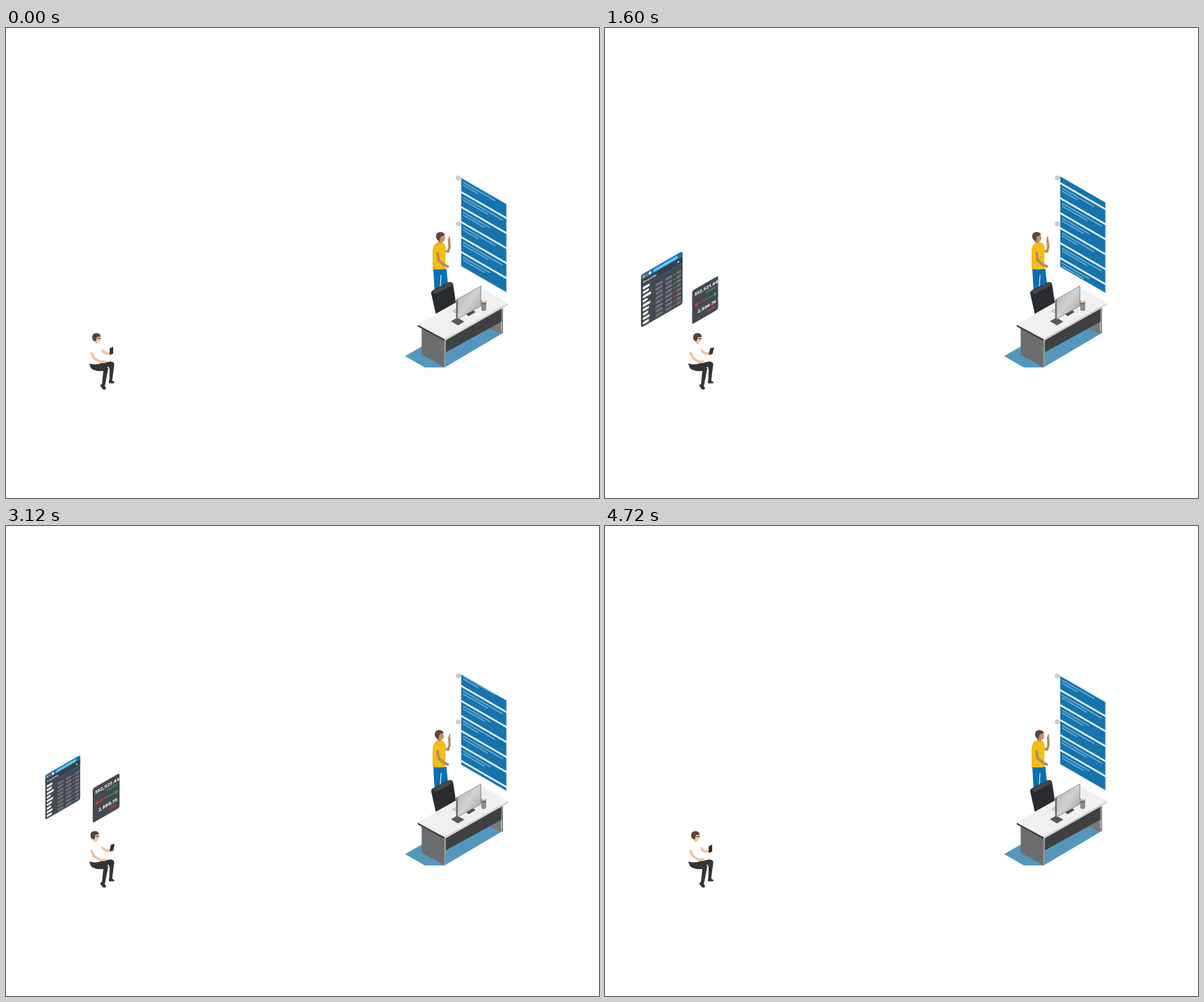
Recreate the animation shown at these times as an HTML page. Size 841x666 px, loop 4.8 s.

```html
<!DOCTYPE html>
<html lang="en">
<head>
<meta charset="utf-8">
<style>
  html, body { margin: 0; width: 100%; height: 100%; overflow: hidden; background: #fff; }
  svg { display: block; width: 841px; height: 666px; }
  text { font-family: Inter, "Open Sans", sans-serif; font-weight: 800; }
  .limb { fill: none; stroke-linecap: round; stroke-linejoin: round; }
</style>
</head>
<body>
<svg viewBox="0 0 841 666" xmlns="http://www.w3.org/2000/svg">
  <defs>
    <linearGradient id="screen" x1="0" y1="0" x2="1" y2="1">
      <stop offset="0" stop-color="#a9abad"/>
      <stop offset=".5" stop-color="#d0d1d2"/>
      <stop offset="1" stop-color="#9b9d9f"/>
    </linearGradient>
    <clipPath id="feedClip"><path d="M0-2H66V126H0Z"/></clipPath>
    <clipPath id="winClip"><rect width="59" height="75" rx="3.5"/></clipPath>
  </defs>

  <!-- feed -->
  <g transform="matrix(1 .577 0 1 645 212)" clip-path="url(#feedClip)"><g id="feed"></g></g>
  <g fill="#cbcdce"><circle cx="641.5" cy="212.5" r="3.5"/><circle cx="641.5" cy="277.5" r="3.5"/></g>

  <!-- standing man -->
  <path fill="#0b6fb0" d="M606 341H624.5L626.5 360 625 376H608Z"/>
  <path d="M617 350L615.500 374" stroke="#fff" stroke-width="1"/>
  <g id="raised" class="limb" stroke="#b58a5f">
    <path d="M622.500 315.500L627 317 629 310 628.300 300" stroke-width="3.400"/>
    <path d="M628.300 300L628.800 296" stroke-width="1.800"/>
  </g>
  <path fill="#f3bd17" d="M605 315Q606 306 611 304.500L617 303Q622 305 623.500 310L623 341.500Q614 343 605 341.500Z"/>
  <path class="limb" d="M612 319L613.500 329 621 335.500 626.500 338" stroke="#b58a5f" stroke-width="3.700"/>
  <g id="headA">
    <path fill="#b58a5f" d="M613 297H619V304Q616 306 613 304Z"/>
    <ellipse cx="618.500" cy="298" rx="4.300" ry="5" fill="#c0946a"/>
    <path fill="#5d463e" d="M610 297Q609 289.500 616 289Q622 289.500 622.500 294Q617 294 616 297L615 302Q611 301 610 297Z"/>
  </g>

  <!-- desk -->
  <path fill="#5497bd" d="M566 465L592 450 690 410 705 432 622 481H594Z"/>
  <path fill="#77797b" d="M685 425L702 415V432L700 433Z"/>
  <path fill="#3f4041" d="M623 441L703 395V416L623 460Z"/>
  <path fill="#8c8e90" d="M702.500 396L705 395V433L702.500 432Z"/>
  <path fill="#6c6d6f" d="M589.500 424L622 441V481L589.500 463Z"/>
  <path fill="#939597" d="M621.500 441L624 440V480L621.500 481Z"/>
  <path fill="#f0f0f1" d="M584 420.500L674 368 712 390 622 441Z"/>
  <path fill="#3c3d3e" d="M584 420.500L622 441V443.500L584 423Z"/>
  <path fill="#d3d4d5" d="M622 441L712 390V392.500L622 443.500Z"/>
  <path fill="#292b2f" d="M603 376Q602.500 373.500 605 372L627 360.500Q633 359 634 363L638 389 609.500 405Z"/>
  <path fill="#45474a" d="M604 374L627 360.500 633.500 362 632 365 609.500 377Z"/>
  <path fill="#d2d3d4" stroke="#999" stroke-width=".6" d="M633 401.500L641 397V402L639 404Z"/>
  <path fill="#555759" d="M631 415.500L640 410.500 650 416 641 421.500Z"/>
  <path fill="#4c4e50" d="M652 405L662 399.500 666 402.500 656 408.500Z"/>
  <path fill="url(#screen)" stroke="#7c7e80" stroke-width=".8" d="M640 384.500L673.500 365.500V394L640 412.500Z"/>
  <path fill="#58595b" d="M638.500 385L640.300 384V413L638.500 412Z"/>
  <path d="M675.500 391L674.500 386M678 391V387M680 391L681 387" stroke="#d98a49" stroke-width="1.400"/>
  <path fill="#8c8e90" d="M674 390.500H681V399.500Q677.500 403 674 399.500Z"/>
  <ellipse cx="677.500" cy="390.500" rx="3.500" ry="1.200" fill="#68696b"/>

  <!-- floating panels -->
  <g id="win"><g id="winBody" transform="matrix(1 -.577 0 1 51 350)" clip-path="url(#winClip)">
    <path fill="#454951" d="M0 0H59V75H0Z"/>
    <path fill="#1573ae" d="M0 0H59V8H0Z"/>
    <circle cx="4" cy="4.500" r="1.900" fill="#f09a3e"/>
    <circle cx="8.500" cy="4.500" r="1.900" fill="#e8483f"/>
    <circle cx="13" cy="4.500" r="1.900" fill="#fff"/>
    <rect x="17.500" y="2.500" width="35" height="4" rx="2" fill="#66cbf3"/>
    <path fill="#3a3f47" d="M0 8H59V16.500H0Z"/>
    <text x="3" y="13.700" font-size="4" fill="#fff">Overview</text>
    <circle cx="53" cy="12" r="1.200" fill="#fff"/>
    <path d="M0 16.800H59" stroke="#1573ae" stroke-width=".8"/>
  </g></g>
  <g id="card"><g transform="matrix(1 -.577 0 1 123 372)">
    <rect width="38" height="49" rx="2.500" fill="#454951"/>
    <text x="3" y="10" font-size="6.100" fill="#fff">352,521.44</text>
    <text x="35" y="16" font-size="4.200" text-anchor="end" fill="#2fae66">PROFIT</text>
    <path d="M5 24H20" stroke="#e3423d" stroke-width="1.200"/>
    <path d="M20 24H34" stroke="#2fae66" stroke-width="1.200"/>
    <path fill="#e3423d" d="M3 24L7 21V27Z"/>
    <path fill="#2fae66" d="M36 24L32 21V27Z"/>
    <text x="8" y="37.500" font-size="6.100" fill="#fff">2,899.75</text>
    <text x="34" y="44" font-size="4.200" text-anchor="end" fill="#e3423d">LOSS</text>
  </g></g>

  <!-- seated man -->
  <g fill="#343435">
    <path d="M118 475.500Q127 478 135 475L148 472.500Q154 473 153.500 477L150.500 500H146.500L147 484 145.500 480 140.500 506H136L138 486Q125 487 120.500 482Z"/>
    <path d="M146 499.500H150.500L154 502Q154 503.500 152 503.500H146Z"/>
    <path d="M134.500 504.500L139.500 505.500 142 511Q140 513.500 137 511.500L134 507.500Z"/>
  </g>
  <circle cx="145" cy="481" r="1" fill="#fff"/>
  <g id="reach">
    <path class="limb" d="M135 456L141 461 150.500 461" stroke="#efc3a0" stroke-width="3.700"/>
    <path id="phone" fill="#303033" d="M147 454L152 451.500V461L147 463.500Z"/>
  </g>
  <path fill="#fff" d="M118 462Q118 449 125 446L131 446Q135 449 136 458L135 474Q127 477 119 475Z"/>
  <path class="limb" d="M121.500 461L125 468 133 473 140 473" stroke="#efc3a0" stroke-width="3.700"/>
  <g id="headB">
    <path fill="#efc3a0" d="M126 441H131.500V446.500Q128 449 126 446Z"/>
    <ellipse cx="130.500" cy="440.500" rx="4" ry="4.800" fill="#f3cbaa"/>
    <path fill="#554239" d="M122.300 440Q121.500 432.500 128.500 432.300Q134 432.500 134.300 437.500L129 437.800 127.500 444Q123 444 122.300 440Z"/>
    <path d="M129 440H134.500" stroke="#3a3030" stroke-width="1"/>
  </g>
</svg>
<script>
const LOOP = 4800, STEP = 80, PITCH = 21.25;
const $ = id => document.getElementById(id);
const clamp = x => Math.min(1, Math.max(0, x));

function add(parent, tag, attrs) {
  const el = document.createElementNS('http://www.w3.org/2000/svg', tag);
  for (const k in attrs) el.setAttribute(k, attrs[k]);
  parent.appendChild(el);
}

// Three posts repeat; each has two text lines.
const posts = [[45, 21], [56, 35], [38, 30]];
for (let i = 0; i < 10; i++) {
  const y = i * PITCH;
  add($('feed'), 'rect', { x: .3, y, width: 64.6, height: 19, fill: '#1573ae', stroke: '#c3d7e4', 'stroke-width': .7 });
  posts[i % 3].forEach((w, n) => add($('feed'), 'path', {
    d: `M4 ${y + 4.6 + n * 4}h${w - 1}`, stroke: '#69a8cf', 'stroke-width': 2, 'stroke-linecap': 'round'
  }));
}

const names = [10, 9, 12, 7, 11, 9, 8, 10, 9];
names.forEach((w, i) => {
  const y = 18.8 + i * 6.2;
  const pill = (x, width, fill) => add($('winBody'), 'rect', { x, y, width, height: 3.6, rx: 1.8, fill });
  pill(2.5, w, '#fff');
  if (!i) return;
  pill(20.5, 10.5, '#70747c');
  pill(34.5, 10, '#70747c');
  pill(50, 7, '#70747c');
  add($('winBody'), 'circle', { cx: 47.2, cy: y + 1.8, r: 1.2, fill: i > 4 && i < 8 ? '#d9413c' : '#2fa562' });
});

// Smooth interpolation through rows of [time, ...values].
function pose(keys, t) {
  const i = keys.findIndex(k => k[0] > t);
  const a = keys[i - 1], b = keys[i];
  const u = (t - a[0]) / (b[0] - a[0]), e = u * u * (3 - 2 * u);
  return a.slice(1).map((v, n) => v + (b[n + 1] - v) * e);
}

// head shift, head angle, forearm angle
const standing = [[0, 0, 0, 0], [960, -3.5, -5, -5], [1600, -3.5, -5, -3], [2560, -.8, -1, 1],
  [3120, -1.6, -2, 1], [3680, -1.6, -3, -5], [4800, 0, 0, 0]];
// head shift, head angle, phone x, phone y, phone angle
const sitting = [[0, 0, 0, 0, 0, 0], [960, 2.3, 4, 1, .3, 14], [1600, 2.3, 4, .5, .2, 14],
  [2560, -1.7, -3, 0, -1.8, 14], [3120, -2, -4, .3, -2, 12], [3680, -1.3, -2, 0, -1.5, 8], [4800, 0, 0, 0, 0, 0]];

const popIn = (t, at) => 1 - (1 - clamp((t - at) / 480)) ** 3;
const popOut = (t, at) => 1 - clamp((t - at) / 480) ** 2.7;
const glide = (t, at) => 1 - (1 - clamp((t - at) / 1500)) ** 2;

function put(id, value) { $(id).setAttribute('transform', value); }
function zoom(id, x, y, s) {
  $(id).style.display = s > .01 ? '' : 'none';
  put(id, `translate(${x} ${y}) scale(${s}) translate(${-x} ${-y})`);
}

function draw(t) {
  // Three posts per scroll, two scrolls per loop.
  put('feed', `translate(0 ${-3 * PITCH * glide(t % (LOOP / 2), 650)})`);

  zoom('win', 80.5, 370.5, popIn(t, 470) * popOut(t, 2880));
  zoom('card', 142, 385.5, popIn(t, 1270) * popOut(t, 3680));

  const [ax, aTurn, arm] = pose(standing, t);
  put('headA', `translate(${ax} 0) rotate(${aTurn} 616 302)`);
  put('raised', `rotate(${arm} 626 317)`);

  const [bx, bTurn, px, py, pTurn] = pose(sitting, t);
  put('headB', `translate(${bx} 0) rotate(${bTurn} 128 445)`);
  put('reach', `translate(${px} ${py * .4})`);
  put('phone', `translate(0 ${py * .6}) rotate(${pTurn} 149.5 461)`);
}

const start = performance.now();
function tick() {
  const t = (performance.now() - start) % LOOP;
  draw(Math.floor(t / STEP) * STEP);
  requestAnimationFrame(tick);
}
tick();
</script>
</body>
</html>
```
